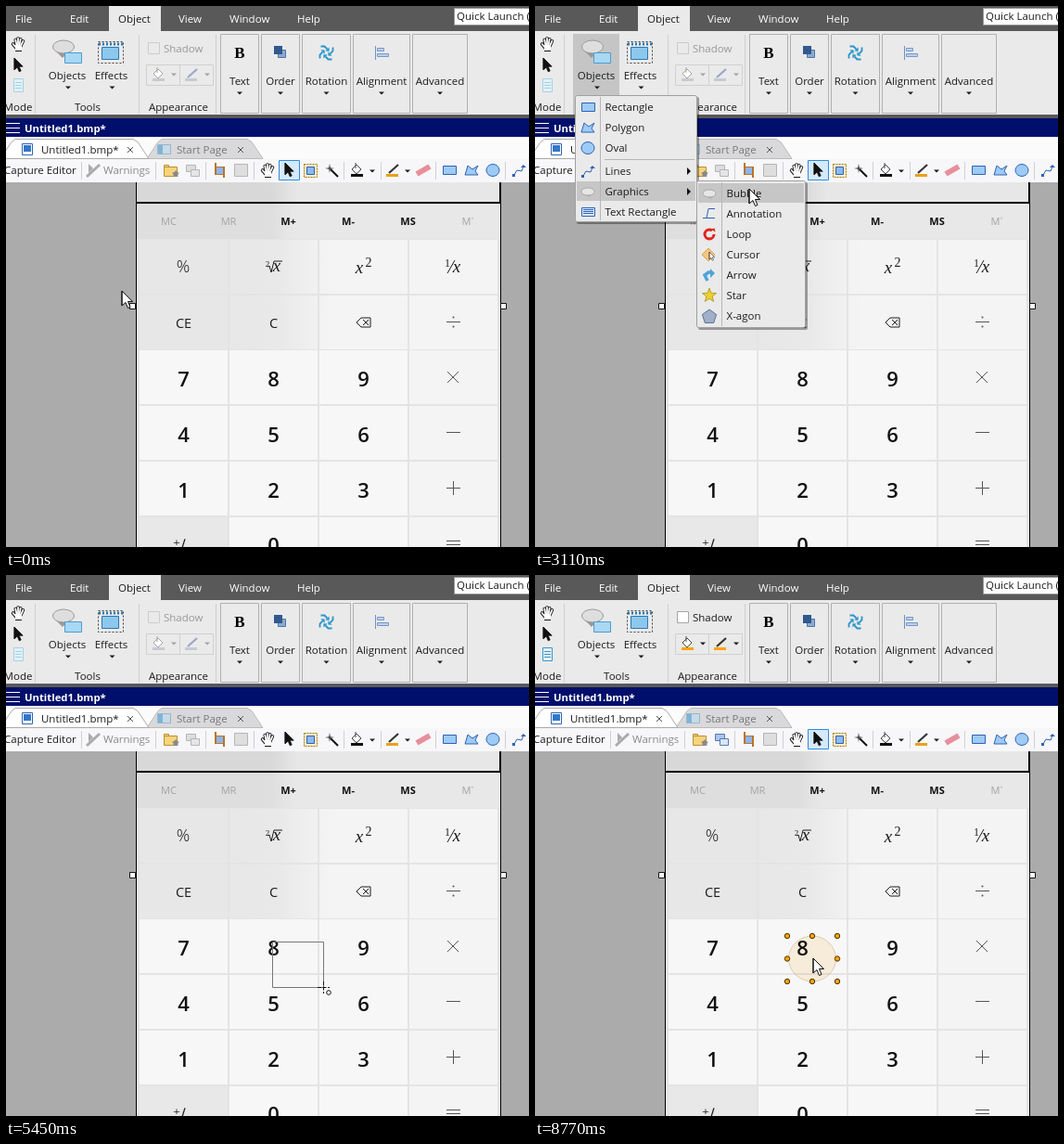
Recreate the animation shown at these times as an HTML page with a canvas. Size 564x583 px, loop 9.18 s.

```html
<!DOCTYPE html>
<html>
<head>
<meta charset="utf-8">
<style>
html, body { margin: 0; width: 100%; height: 100%; overflow: hidden; background: #ababab; }
canvas { display: block; }
</style>
</head>
<body>
<canvas id="stage" width="564" height="583"></canvas>
<script>
const c = document.getElementById('stage').getContext('2d');
const LOOP = 9180;
const UI = '"Open Sans", "Noto Sans", sans-serif';
const SERIF = '"Liberation Serif", serif';
const INK = '#1c1c1c', BLUE = '#2f62b5', SKY = '#9dcbf5', GREY = '#a3a3a3', ORANGE = '#ffa500';
const PANEL = '#eaeaea', RULE = '#d0d0d0';

// Drawing helpers
function text(s, x, y, { size = 11.5, color = INK, weight = 400, align = 'left', font = UI, style = '' } = {}) {
  c.font = `${style} ${weight} ${size}px ${font}`;
  c.fillStyle = color;
  c.textAlign = align;
  c.fillText(s, x, y);
}
const centred = (s, x, y, style) => text(s, x, y, { ...style, align: 'center' });
function paint(fill, stroke, width = 1) {
  if (fill) { c.fillStyle = fill; c.fill(); }
  if (stroke) { c.strokeStyle = stroke; c.lineWidth = width; c.stroke(); }
}
function box(x, y, w, h, fill, stroke, round = 0) {
  const inset = stroke ? .5 : 0;
  c.beginPath();
  c.roundRect(x + inset, y + inset, w - 2 * inset, h - 2 * inset, round);
  paint(fill, stroke);
}
function shape(x, y, pts, fill, stroke, width) {
  c.beginPath();
  for (let i = 0; i < pts.length; i += 2) c.lineTo(x + pts[i], y + pts[i + 1]);
  if (fill) c.closePath();
  paint(fill, stroke, width);
}
const line = (x0, y0, x1, y1, color, width) => shape(0, 0, [x0, y0, x1, y1], null, color, width);
const hline = (x, y, w, color) => box(x, y, w, 1, color);
const vline = (x, y, h, color) => box(x, y, 1, h, color);
function oval(x, y, rx, ry, fill, stroke, width, turns = 1) {
  c.beginPath();
  c.ellipse(x, y, rx, ry, 0, 0, turns * 2 * Math.PI);
  paint(fill, stroke, width);
}
// Regular polygon; an inner radius makes it a star
function ngon(x, y, n, r, fill, stroke, inner = r) {
  const pts = [];
  for (let i = 0; i < n; i++) {
    const a = i * 2 * Math.PI / n - Math.PI / 2, q = i % 2 ? inner : r;
    pts.push(q * Math.cos(a), q * Math.sin(a));
  }
  shape(x, y, pts, fill, stroke);
}
function triangle(x, y, r, angle, color) {
  c.save();
  c.translate(x, y);
  c.rotate(angle);
  shape(0, 0, [0, -r, r, 0, 0, r], color);
  c.restore();
}
const caret = (x, y, color = INK) => triangle(x, y - 1.5, 3, Math.PI / 2, color);
function x(cx, cy, r, color) {
  line(cx - r, cy - r, cx + r, cy + r, color);
  line(cx + r, cy - r, cx - r, cy + r, color);
}
function dashed(pattern, drawing) {
  c.setLineDash(pattern);
  drawing();
  c.setLineDash([]);
}
function fade(x0, x1, ...stops) {
  const g = c.createLinearGradient(x0, 0, x1, 0);
  stops.forEach((s, i) => g.addColorStop(i / (stops.length - 1), s));
  return g;
}

function arrow(x, y, k = 1, fill = '#fff') {
  shape(x, y, [0, 0, 0, 16, 4, 12.5, 6.5, 18.5, 9, 17.5, 6.5, 11.5, 11.5, 11.5].map(v => v * k), fill, '#111', k);
  line(x, y, x, y + 16 * k, '#111', k);
}
function cross(x, y) {
  dashed([4, 1.5], () => {
    line(x - 6, y + .5, x + 7, y + .5, '#111');
    line(x + .5, y - 6, x + .5, y + 7, '#111');
  });
  oval(x + 6, y + 6, 2.3, 2.3, '#fff', '#111');
}

// Icons, centred on x, y
const icon = {
  rect: (x, y) => box(x - 7, y - 5, 15, 10, SKY, BLUE),
  poly: (x, y) => shape(x, y, [-7, 5, -4, -5, 1, -1, 7, -5, 4, 1, 7, 5], SKY, BLUE),
  oval: (x, y) => oval(x, y, 7, 6.5, SKY, BLUE),
  line(x, y) {
    line(x - 5, y + 5, x - 2, y, BLUE);
    line(x - 2, y, x + 3, y + 1, BLUE);
    line(x + 3, y + 1, x + 5, y - 4, BLUE);
    box(x - 7, y + 4, 3, 3, BLUE);
    triangle(x + 5, y - 3, 3, -Math.PI / 2, BLUE);
  },
  bubble(x, y) {
    triangle(x + 1, y + 3, 3, Math.PI / 2, '#aaa');
    oval(x, y, 7, 4, '#e6e6e6', '#aaa');
  },
  textRect(x, y) {
    box(x - 7, y - 5, 15, 10, '#dbe9fb', BLUE);
    for (const d of [-3, -1, 1]) hline(x - 5, y + d, 11, BLUE);
  },
  note(x, y) {
    line(x - 7, y + 4.5, x + 6, y + 4.5, BLUE);
    line(x - 3, y + 4.5, x - 1, y - 5.5, BLUE);
    line(x - 1, y - 5.5, x + 6, y - 5.5, BLUE);
  },
  loop(x, y) {
    oval(x, y, 5, 5, null, '#e0241c', 3, .85);
    triangle(x + 4, y - 4, 3, -1, '#e0241c');
  },
  cursor(x, y) {
    ngon(x - 1, y, 4, 7, '#f5c680', '#d9a050');
    arrow(x, y - 3, .5);
  },
  arrow(x, y) {
    shape(x, y, [-2, 6, -5, 0, -1, -3, 2, -3], null, '#4da3dc', 3.5);
    triangle(x + 1, y - 2, 5, 0, '#4da3dc');
  },
  star: (x, y) => ngon(x, y, 10, 8, '#ecd02f', '#b8a030', 3.3),
  pentagon: (x, y) => ngon(x, y + 1, 5, 8, '#9fb0c9', '#5f7090'),
  hand(x, y) {
    // Fingers fan out from the palm: black strokes first, then white on top
    for (const [color, width] of [['#111', 3.6], ['#fff', 1.8]]) {
      c.lineCap = 'round';
      for (let i = -2; i < 3; i++)
        line(x + i, y + 4, x + i * 2.7, y - 6 + i * i * (i < 0 ? 1.5 : .7), color, width);
      c.lineCap = 'butt';
    }
    box(x - 3, y + 1, 7, 6, '#fff');
    hline(x - 3, y + 7, 7, '#111');
  },
  pointer: (x, y) => arrow(x - 4, y - 8, .8, '#111'),
  bucket(x, y, on = true, chip = '#111') {
    ngon(x, y - 1, 4, 5, '#fff', on ? '#444' : GREY);
    line(x - 1, y - 8, x - 1, y - 2, on ? '#444' : GREY);
    box(x - 6, y + 4, 13, 3, chip);
  },
  pen(x, y, on = true, chip = '#e9a020') {
    line(x - 4, y + 3, x + 6, y - 6, on ? '#333' : '#9ba6c8', 2.2);
    box(x - 7, y + 4, 13, 3, chip);
  },
  flag(x, y) {
    triangle(x - 5, y - 2, 5, 0, '#aaa');
    line(x - 7, y + 7, x + 7, y - 6, '#aaa', 3);
  },
  folder(x, y) {
    box(x - 8, y - 6, 6, 4, '#f6d47c', '#b99036');
    box(x - 8, y - 4, 15, 11, '#f6d47c', '#b99036');
    ngon(x + 5, y + 4, 10, 4, '#8a8a8a', null, 2.5);
  },
  copies(x, y, on) {
    const edge = on ? '#5878b0' : '#b5b5b5';
    box(x - 8, y - 6, 11, 8, on ? '#a9c5ee' : '#ddd', edge);
    box(x - 3, y - 1, 10, 8, on ? '#d8e6fa' : '#e5e5e5', edge);
  },
  crop(x, y) {
    box(x - 4, y - 4, 9, 9, '#8fb5ee', '#b8742a');
    line(x - 4, y - 8, x - 4, y + 5, '#b8742a', 2);
    line(x + 5, y - 4, x + 5, y + 8, '#b8742a', 2);
  },
  blank: (x, y) => box(x - 7, y - 7, 15, 14, '#dedede', '#b5b5b5'),
  region(x, y) {
    dashed([2, 1], () => box(x - 7, y - 7, 15, 15, '#fff0c8', '#a87510'));
    box(x - 4, y - 4, 9, 9, '#8eb9ee', BLUE);
  },
  wand(x, y) {
    line(x - 1, y - 1, x + 7, y + 7, '#111', 2);
    ngon(x - 2, y - 2, 8, 5, '#444', null, 1.2);
  },
  eraser: (x, y) => line(x - 7, y + 4, x + 7, y - 4, '#e78f9b', 6)
};

function drawRibbon(hot, on) {
  box(0, 0, 564, 27, '#595959');
  box(0, 27, 564, 90, PANEL);
  box(111, 0, 56, 28, PANEL);
  const tabs = { File: 10, Edit: 69, Object: 121, View: 186, Window: 241, Help: 314 };
  for (const s in tabs) text(s, tabs[s], 18, { color: s == 'Object' ? INK : '#fff' });
  box(483, 2, 90, 19, '#fff', '#999');
  text('Quick Launch (Ctrl+Q)', 486, 15);

  for (const x of [31, 143, 226]) vline(x, 31, 85, RULE);
  const groups = { Mode: 13, Tools: 88, Appearance: 186 };
  for (const s in groups) centred(s, groups[s], 113);

  const edge = on ? '#4095c5' : '#a9d0df';
  icon.hand(13, 41);
  icon.pointer(13, 64);
  box(8, 78, 11, 15, '#e0f2fa', edge);
  for (let y = 82; y < 90; y += 3) hline(10, y, 7, edge);

  if (hot) box(41, 30, 50, 87, '#c5c5c5');
  triangle(61, 50, 6, Math.PI / 2, '#999');
  oval(62, 44, 11.5, 7, '#dedede', '#999');
  box(63, 50, 19, 12, '#a9d8f5', '#4e9ccc');
  dashed([2, 2], () => {
    box(99, 38, 28, 24, null, '#444');
    line(100, 41, 126, 41, '#2f78ad', 3);
  });
  box(103, 44, 19, 14, '#8cc8ee', '#2f78ad');
  [['Objects', 66], ['Effects', 113.5]].forEach(([s, x]) => {
    centred(s, x, 79);
    caret(x + 1, 88);
  });

  box(153, 39, 13, 13, on ? '#fff' : PANEL, on ? '#a5a5a5' : '#ccc');
  text('Shadow', 170, 50, { color: on ? INK : '#999' });
  ['bucket', 'pen'].forEach((name, i) => {
    const x = 151 + i * 36;
    box(x, 63, 37, 23, PANEL, RULE);
    icon[name](x + 13, 74, on, on ? ORANGE : '#c5cad6');
    caret(x + 30, 74, on ? INK : GREY);
  });

  let left = 231;
  for (const s of ['Text', 'Order', 'Rotation', 'Alignment', 'Advanced']) {
    c.font = `11.5px ${UI}`;
    const w = Math.max(42, Math.floor(c.measureText(s).width + 8));
    box(left, 30, w, 86, PANEL, '#b0b0b0');
    centred(s, left + w / 2, 85);
    caret(left + w / 2, 94);
    left += w + 2;
  }
  centred('B', 252, 56, { size: 17, weight: 700, font: SERIF, color: '#000' });
  box(293, 47, 9, 9, '#8caad0', '#4c74a8');
  box(289, 43, 9, 9, '#31598e');
  for (let i = 0; i < 4; i++) {
    c.save();
    c.translate(345.5, 50.5);
    c.rotate(i * Math.PI / 2);
    shape(0, 0, [1, -4, -2, -7, -6, -7], null, '#2a95ca', 1.8);
    triangle(1, -4, 3, .8, '#2a95ca');
    c.restore();
  }
  vline(398, 43, 15, '#6f91c0');
  box(400, 45, 8, 4, '#b9d0ee', '#7898c5');
  box(400, 51, 13, 4, '#b9d0ee', '#7898c5');
}

function tab(left, right, fill, edge) {
  shape(0, 164.5, [left, 0, left + 12, -18, left + 16, -21, right - 17, -21, right - 12, -18, right, 0], fill, edge);
}
function drawBars(selecting, on) {
  box(0, 117, 564, 4, '#595959');
  box(0, 121, 564, 20, '#000f6b');
  for (let y = 126; y < 140; y += 5) hline(0, y, 15, '#fff');
  text('Untitled1.bmp*', 20, 136, { size: 11.3, weight: 700, color: '#fff' });

  box(0, 141, 564, 49, '#fbfbfc');
  tab(152, 277, '#d9d9dc', '#bbb');
  tab(-6, 154, '#fff', '#aaa');
  box(0, 165, 564, 25, '#f7f7f9');
  box(17, 148, 12, 13, '#fff', BLUE);
  box(19, 150, 8, 7, '#3278c8');
  box(163, 149, 15, 11, '#c7dae8', '#9cb4c6');
  box(164, 150, 5, 9, '#7eb5d8');
  text('Untitled1.bmp*', 38, 159);
  text('Start Page', 184, 159, { color: '#777' });
  for (const cx of [134, 253]) x(cx, 155, 3, '#555');

  text('Capture Editor', -2, 181);
  text('Warnings', 105, 181, { color: '#888' });
  for (const x of [81, 161, 215, 267, 364, 404, 463, 538]) vline(x, 168, 19, RULE);
  if (selecting) box(294, 166, 23, 22, '#d5e9fb', '#2d8ce0');
  const tools = { flag: 94, folder: 178, copies: 202, crop: 230, blank: 253, hand: 282, pointer: 305, region: 328,
    wand: 351, bucket: 378, pen: 417, eraser: 450, rect: 478, poly: 502, oval: 525, line: 553 };
  for (const name in tools) icon[name](tools[name], 177, on || name != 'copies');
  for (const x of [395, 433]) caret(x, 178);
}

function drawCalculator() {
  box(0, 190, 564, 393, '#ababab');
  box(140, 190, 394, 393, '#000');
  box(141, 190, 391, 21, fade(285, 315, '#d8d8d8', '#e7e7e7'));
  box(141, 213, 392, 370, '#e4e4e4');
  box(141, 213, 392, 38, fade(285, 310, '#dedede', '#e8e8e8'));
  ['MC', 'MR', 'M+', 'M-', 'MS', 'M˅'].forEach((s, i) => {
    const live = i > 1 && i < 5;
    centred(s, 175.5 + i * 64.5, 236, { size: 11, weight: live ? 700 : 400, color: live ? '#111' : GREY });
  });

  const upper = fade(240, 350, '#e7e7e7', '#e9e9e9', '#f4f4f4');
  const digit = { size: 22, weight: 600, color: '#111' };
  for (let row = 0; row < 6; row++) for (let col = 0; col < 4; col++) {
    const x = 144 + col * 97, y = Math.round(252 + row * 59.7);
    const sign = row == 5 && col == 0;
    box(x, y, 95, 58, row < 2 ? upper : sign ? '#e8e8e8' : col < 3 ? '#f7f7f7' : '#f4f4f4');
    if (row > 1 && row < 5 && col < 3) centred(13 - row * 3 + col, x + 47.5, y + 38.5, digit);
  }
  centred('0', 288.5, 589, digit);
  centred('⁺∕₋', 191, 586, { size: 16, font: '"DejaVu Sans", sans-serif' });
  centred('%', 191, 287, { size: 18, weight: 300 });
  centred('CE', 191.5, 347, { size: 14.5 });
  centred('C', 288.5, 347, { size: 14.5 });

  const upright = { font: SERIF, size: 12 }, italic = { font: SERIF, size: 19, style: 'italic' };
  centred('2', 282, 281, { ...upright, size: 9 });
  shape(282, 281, [0, 0, 2, -1, 4, 6, 7, -6, 16, -6], null, INK);
  centred('x', 292, 286, italic);
  centred('x', 381, 288, italic);
  centred('2', 391, 281, { ...upright, size: 14 });
  centred('1', 476, 281, upright);
  line(476, 288, 484, 274, INK);
  centred('x', 486, 287, italic);
  shape(378, 341, [0, 0, 5, -5, 15, -5, 15, 5, 5, 5], '#f4f4f4', INK);
  line(378, 341, 383, 346, INK);
  x(388, 341, 3, INK);

  const op = '#555';
  for (const y of [340, 459, 519, 576, 580]) hline(475, y, 15, op);
  for (const y of [335.5, 345.5]) oval(482.5, y, 1, 1, op);
  x(482, 400, 6, op);
  vline(482, 512, 15, op);
  for (const x of [133, 533]) box(x, 320, 7, 7, '#fff', '#111');
}

// Menus as [label, icon, row centre]
const mainItems = [['Rectangle', 'rect'], ['Polygon', 'poly'], ['Oval', 'oval'], ['Lines', 'line'],
  ['Graphics', 'bubble'], ['Text Rectangle', 'textRect']].map((m, i) => [...m, 109 + i * 22 + (i > 2 ? 3 : 0)]);
const subItems = [['Bubble', 'bubble'], ['Annotation', 'note'], ['Loop', 'loop'], ['Cursor', 'cursor'],
  ['Arrow', 'arrow'], ['Star', 'star'], ['X-agon', 'pentagon']].map((m, i) => [...m, 202 + i * 22]);

function drawMenu(items, x, y, w, h, hovered, shade) {
  box(x + 2, y + 2, w, h, 'rgba(0,0,0,.35)', null, 2);
  box(x, y, w, h, PANEL, '#a0a0a0', 2);
  for (const [label, name, cy] of items) {
    if (label == hovered) box(x + 2, cy - 11, w - 4, 21, shade);
    icon[name](x + 14, cy);
    text(label, x + 32.5, cy + 4);
    if (label == 'Lines' || label == 'Graphics') triangle(x + 121, cy, 4, 0, '#111');
  }
  vline(x + 27, y + 2, h - 4, '#b5b5b5');
}
function itemAt(items, x, y, left, right) {
  const hit = x >= left && x < right && items.find(m => Math.abs(m[2] - y) <= 11);
  return hit ? hit[0] : '';
}
function drawMenus(t, x, y) {
  if (t < 1060 || t >= 3800) return;
  const closing = t >= 3680, shade = closing ? '#dcdde2' : '#c6c6c6';
  const sub = closing ? 'Bubble' : itemAt(subItems, x, y, 174, 292);
  const main = closing ? 'Polygon' : itemAt(mainItems, x, y, 43, 174) || (sub && 'Graphics');
  c.globalAlpha = closing ? .95 : 1;
  drawMenu(mainItems, 43, 96, 132, 137, main, shade);
  hline(75, 165, 97, '#b5b5b5');
  if (t >= 2300) drawMenu(subItems, 174, 188, 118, 159, sub, shade);
  c.globalAlpha = 1;
}

// Pointer moves: start, end, number of jumps, then the points to pass
const start = [125, 307];
const moves = [
  [280, 1060, 7, [66, 81]],
  [1620, 2300, 5, [111, 206]],
  [2690, 3680, 8, [250, 206], [100, 135], [224, 264]],
  [3800, 4730, 8, [327, 435], [288, 395]],
  [4880, 5450, 5, [342, 444]],
  [5890, 6370, 5, [358, 441], [316, 420]],
  [7160, 7640, 5, [300, 413]]
];
function pointer(t) {
  let from = start;
  for (const [t0, t1, jumps, ...stops] of moves) {
    if (t < t0) break;
    const jump = Math.floor((t - t0) * (jumps - 1) / (t1 - t0) + 1e-6) + 1;
    const path = [from, ...stops], u = Math.min(1, jump / jumps) * stops.length;
    const i = Math.min(stops.length - 1, Math.floor(u));
    from = path[i].map((v, k) => Math.round(v + (path[i + 1][k] - v) * (u - i)));
  }
  return from;
}

function drawSelection(cx, cy) {
  c.globalCompositeOperation = 'multiply';
  oval(cx, cy, 25.5, 24.5, '#fff3e0', '#e5dccb');
  c.globalCompositeOperation = 'source-over';
  for (const i of [-1, 0, 1]) for (const j of [-1, 0, 1])
    if (i || j) oval(cx + i * 27, cy + j * 24.5, 2.7, 2.7, ORANGE, '#4a3000');
}

function draw(t) {
  const [x, y] = pointer(t);
  const on = t >= 5890, drawing = t >= 3680 && !on;
  const overObjects = x > 41 && x < 91 && y > 30 && y < 117;
  drawRibbon(t < 3680 && (t >= 1060 || overObjects), on);
  drawBars(t < 3800 || on, on);
  drawCalculator();
  if (t >= 4880 && !on) box(287, 395, x - 286, y - 394, null, '#777');
  if (on) drawSelection(...(t < 7160 ? [315, 420.5] : [x - 1, y + .5]));
  drawMenus(t, x, y);
  if (t >= 6370 && t < 6500) {
    c.globalAlpha = .65;
    arrow(358, 441);
    c.globalAlpha = 1;
  }
  (drawing ? cross : arrow)(x, y);
}

function tick() {
  draw(performance.now() % LOOP);
  requestAnimationFrame(tick);
}
tick();
</script>
</body>
</html>
```
